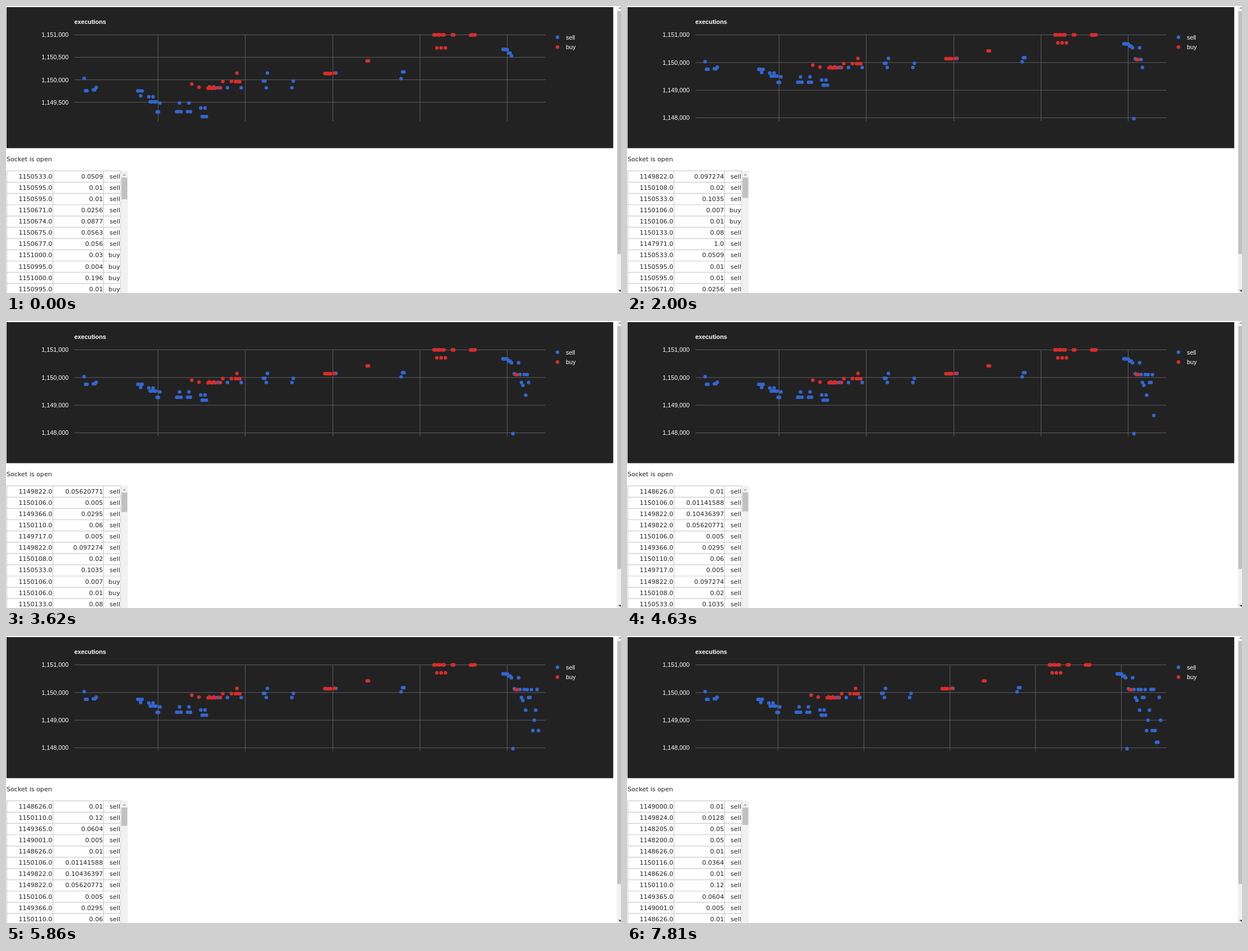
An HTML page for the animation above (8000 ms loop, 1094 by 512 pixels).

```html
<!DOCTYPE html>
<html lang="en">
<head>
<meta charset="utf-8">
<title>executions</title>
<style>
  html, body { margin: 0; width: 100%; height: 100%; overflow: hidden; background: #fff; }
  svg { display: block; width: 1094px; height: 512px; }
  .chart { font: 10.8px "Liberation Sans", Arial, sans-serif; fill: #fff; }
  .title { font-weight: bold; }
  .end { text-anchor: end; }
  .page { font: 11.1px "DejaVu Sans", Verdana, sans-serif; fill: #222; }
  .grid { stroke: #5e5e5e; fill: none; }
  .cells { stroke: #ccc; stroke-width: 1.2; fill: none; }
  .sell { fill: #3366d0; }
  .buy { fill: #da2c2c; }
</style>
</head>
<body>
<svg viewBox="0 0 1094 512">
  <rect x="1" y="2" width="1079.2" height="251.6" fill="#222"/>
  <g class="chart">
    <text class="title" x="121.6" y="31.5">executions</text>
    <text x="996" y="59.6">sell</text>
    <text x="996" y="77">buy</text>
  </g>
  <circle class="sell" cx="981" cy="55.7" r="3.2"/>
  <circle class="buy" cx="981" cy="73.2" r="3.2"/>
  <g id="plot"></g>

  <text class="page" x="1" y="277.2">Socket is open</text>
  <path class="cells" id="cells"/>
  <g class="page" id="rows"></g>
  <rect x="204.6" y="294" width="12" height="218" fill="#f1f1f1"/>
  <path d="M207.6 302.5l2.8-3 2.8 3z" fill="#a3a3a3"/>
  <rect id="thumb" x="205.4" y="306" width="10.3" fill="#c1c1c1"/>

  <rect x="1086.5" width="8" height="512" fill="#f1f1f1"/>
  <rect x="1087.5" y="9" width="7" height="433.5" fill="#c1c1c1"/>
  <path d="M1089 5l3.5-3.5 3.5 3.5z" fill="#a3a3a3"/>
  <path d="M1089 506.5l3.5 3.5 3.5-3.5z" fill="#505050"/>
</svg>
<script>
const LOOP = 8000, STEP = 2.53, TOP = 51.5, LEFT = 121.5, RIGHT = 959.5;
const SHOWN = 11, ROW = 20.1, TABLE_TOP = 294.2;

// Bursts of earlier executions: x, price - 1150000, count, and a jump
// that every third one makes, beginning with number "at".
const BURSTS = {
  sell: [
    [139, -244, 3, 275, 0], [155.5, -225, 3, 56, 2], [234.5, -247, 4, -110, 2],
    [254, -491, 6, 113, 0], [268.8, -716, 3, 198, 2], [303.7, -711, 4, 193, 2],
    [323, -711, 3, 193, 1], [346.4, -819, 5, 190, 0], [376.5, -178, 2],
    [394, -178, 1], [418.5, -178, 1], [458, -28, 3, -150, 2], [465, 150, 1],
    [508.6, -178, 2, 150, 1], [587, 150, 1], [702.9, 175, 3, -150, 0]
  ],
  buy: [
    [330.5, -94, 1], [343.3, -166, 1], [359.5, -190, 6, 32, 1], [381.5, -180, 1],
    [385.7, -38, 1], [401, -38, 1], [408.3, -42, 4, 192, 1], [567.4, 138, 5],
    [584.7, 150, 1], [642.3, 420, 2], [761.4, 1000, 9, -290, 2], [794, 1000, 2]
  ]
};

// Execution log, oldest first; the first 11 fill the table at the start.
const TRADES = `1150995 0.01 buy,1151000 0.196 buy,1150995 0.004 buy,1151000 0.03 buy,
1150677 0.056,1150675 0.0563,1150674 0.0877,1150671 0.0256,1150595 0.01,1150595 0.01,1150533 0.0509,
1147971 1.0,1150133 0.08,1150106 0.01 buy,1150106 0.007 buy,1150533 0.1035,1150108 0.02,
1149822 0.097274,1149717 0.005,1150110 0.06,1149366 0.0295,1150106 0.005,1149822 0.05620771,
1149822 0.10436397,1150106 0.01141588,1148626 0.01,1149001 0.005,1149365 0.0604,1150110 0.12,
1148626 0.01,1150116 0.0364,1148626 0.01,1148200 0.05,1148205 0.05,1149824 0.0128,1149000 0.01`
  .split(",").map((line, i) => {
    const [price, size, side = "sell"] = line.trim().split(" ");
    const x = i < 4 ? 826.6 + i * STEP : 899.2 + (i - 10) * STEP;
    return { price, size, side, x };
  });
const ARRIVALS = TRADES.length - SHOWN;

// Trades arrive at a steady beat, with a short hold before three of them.
const HOLDS = [9, 14, 23];
const arrival = i => 140 + 308.5 * i + 82 * HOLDS.filter(h => h <= i).length;

const past = Object.entries(BURSTS).flatMap(([side, bursts]) =>
  bursts.flatMap(([x, price, count, jump = 0, at = 0]) =>
    Array.from({ length: count }, (_, i) => ({
      side,
      x: x + i * STEP,
      price: 1150000 + price + (i % 3 === at ? jump : 0)
    }))));

const el = id => document.getElementById(id);
const label = (text, x, y) => `<text class="end" x="${x}" y="${y}">${text}</text>`;

function drawPlot(n) {
  const scaleX = x => n === ARRIVALS ? 2.36 + x * 0.9839 : x;
  const [tick, gap] = n ? [1000, 49.35] : [500, 40.05];
  const scaleY = price => TOP + (1151000 - price) / tick * gap;

  let lines = "", labels = "";
  for (let i = 0; i < 4; i++) {
    const price = 1151000 - i * tick, y = scaleY(price);
    lines += `M${LEFT} ${y}H${RIGHT}`;
    labels += label(price.toLocaleString("en-US"), 111.3, y + 3.9);
  }
  for (let i = 0; i < 5; i++)
    lines += `M${Math.floor(scaleX(270.6 + i * 155.25)) + 0.5} 51V205.5`;

  const points = past.concat(TRADES.slice(0, SHOWN + n));
  const dots = side => points.filter(p => p.side === side).map(p =>
    `<circle class="${side}" cx="${scaleX(p.x)}" cy="${scaleY(p.price)}" r="3.2"/>`).join("");
  el("plot").innerHTML = `<path class="grid" d="${lines}"/><g class="chart">${labels}</g>`
    + dots("sell") + dots("buy");
}

function drawTable(n) {
  el("rows").innerHTML = TRADES.slice(n, n + SHOWN).reverse().map((t, i) => {
    const y = 307.7 + i * ROW;
    return label(t.price + ".0", 82.4, y) + label(t.size, 172.5, y) + label(t.side, 203, y);
  }).join("");
  el("thumb").setAttribute("height", 39 * 97 / (97 + n));
}

let cells = "";
for (const x of [1.5, 83.5, 173.5, 204]) cells += `M${x} ${TABLE_TOP}V512`;
for (let i = 0; i < SHOWN; i++) cells += `M1 ${TABLE_TOP + i * ROW}H204.5`;
el("cells").setAttribute("d", cells);

let current = -1;
function render() {
  const time = performance.now() % LOOP;
  let n = 0;
  while (n < ARRIVALS && arrival(n) <= time) n++;
  if (n !== current) {
    current = n;
    drawPlot(n);
    drawTable(n);
  }
  requestAnimationFrame(render);
}
render();
</script>
</body>
</html>
```
